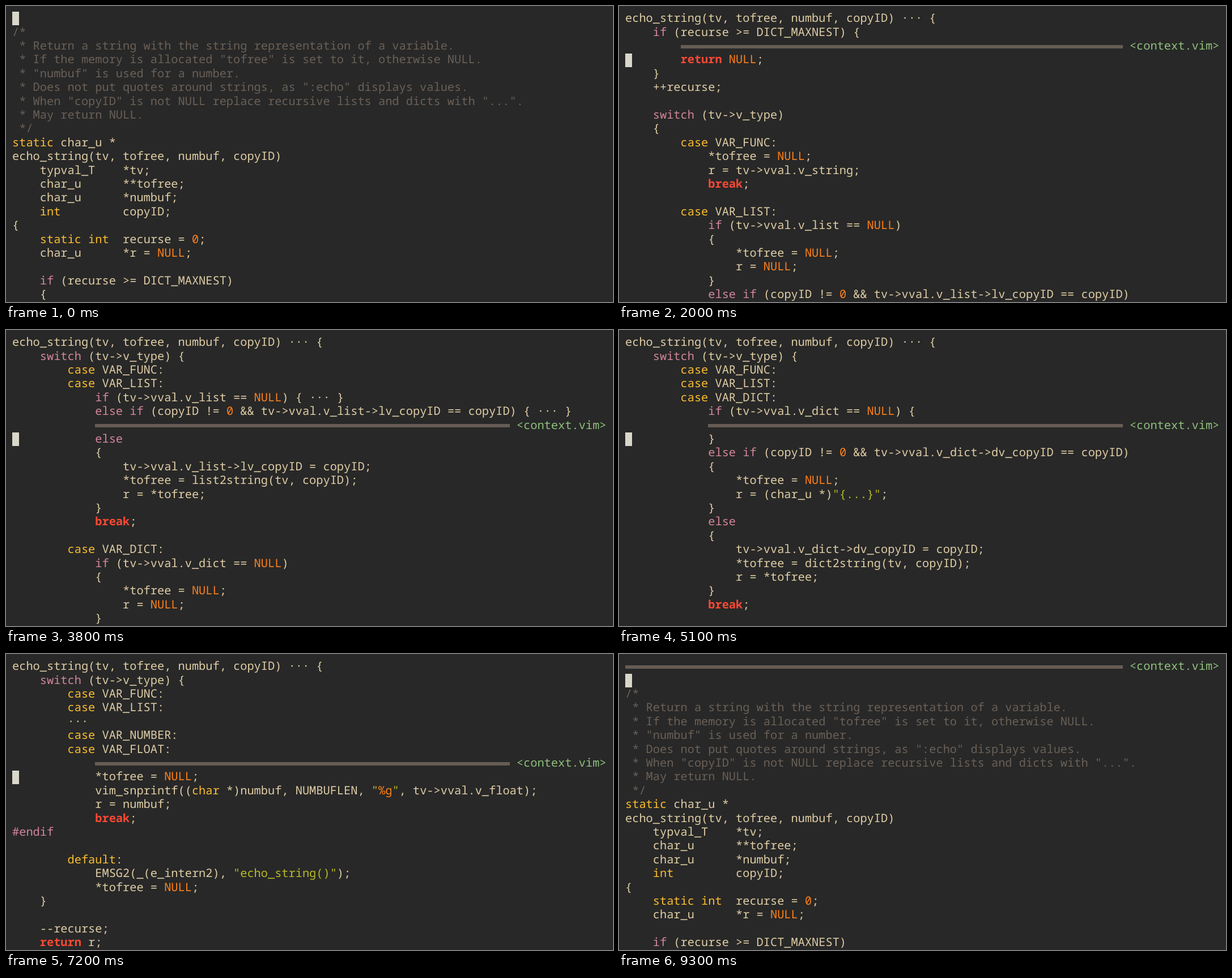
Write an HTML page that moves like this. It is 1071x523 px and loops after 9400 ms.

```html
<!DOCTYPE html>
<html lang="en">
<head>
<meta charset="utf-8">
<title>Scrolling code with context</title>
<style>
html, body { margin: 0; width: 100%; height: 100%; overflow: hidden; background: #282828; }
#screen {
  position: relative; width: 1071px; height: 523px; overflow: hidden;
  color: #dfcda5;
  font: 20.32px/24.4px "Noto Sans Mono", "DejaVu Sans Mono", monospace;
  font-variant-ligatures: none;
  text-rendering: geometricPrecision;
}
.row, .bar, .block { position: absolute; white-space: pre; }
.row { left: 11px; height: 24.4px; }
.bar { height: 6px; background: #665c54; }
.block { left: 11px; width: 12px; height: 24px; background: #d9d7ca; }
.comment { color: #6a6057; }
.string { color: #b8bb26; }
.constant { color: #fe8019; }
.jump { color: #fb4934; font-weight: bold; }
.branch { color: #d3869b; }
.type { color: #fabd2f; }
.tag { color: #8ec07c; }
.under { color: #282828; }
</style>
</head>
<body>
<div id="screen"></div>
<script>
const code = String.raw`
/*
 * Return a string with the string representation of a variable.
 * If the memory is allocated "tofree" is set to it, otherwise NULL.
 * "numbuf" is used for a number.
 * Does not put quotes around strings, as ":echo" displays values.
 * When "copyID" is not NULL replace recursive lists and dicts with "...".
 * May return NULL.
 */
static char_u *
echo_string(tv, tofree, numbuf, copyID)
    typval_T    *tv;
    char_u      **tofree;
    char_u      *numbuf;
    int         copyID;
{
    static int  recurse = 0;
    char_u      *r = NULL;

    if (recurse >= DICT_MAXNEST)
    {
        EMSG(_("E724: variable nested too deep for displaying"));
        *tofree = NULL;
        return NULL;
    }
    ++recurse;

    switch (tv->v_type)
    {
        case VAR_FUNC:
            *tofree = NULL;
            r = tv->vval.v_string;
            break;

        case VAR_LIST:
            if (tv->vval.v_list == NULL)
            {
                *tofree = NULL;
                r = NULL;
            }
            else if (copyID != 0 && tv->vval.v_list->lv_copyID == copyID)
            {
                *tofree = NULL;
                r = (char_u *)"[...]";
            }
            else
            {
                tv->vval.v_list->lv_copyID = copyID;
                *tofree = list2string(tv, copyID);
                r = *tofree;
            }
            break;

        case VAR_DICT:
            if (tv->vval.v_dict == NULL)
            {
                *tofree = NULL;
                r = NULL;
            }
            else if (copyID != 0 && tv->vval.v_dict->dv_copyID == copyID)
            {
                *tofree = NULL;
                r = (char_u *)"{...}";
            }
            else
            {
                tv->vval.v_dict->dv_copyID = copyID;
                *tofree = dict2string(tv, copyID);
                r = *tofree;
            }
            break;

        case VAR_STRING:
        case VAR_NUMBER:
            *tofree = NULL;
            r = get_tv_string_buf(tv, numbuf);
            break;

#ifdef FEAT_FLOAT
        case VAR_FLOAT:
            *tofree = NULL;
            vim_snprintf((char *)numbuf, NUMBUFLEN, "%g", tv->vval.v_float);
            r = numbuf;
            break;
#endif

        default:
            EMSG2(_(e_intern2), "echo_string()");
            *tofree = NULL;
    }

    --recurse;
    return r;
}`;

const lines = code.split("\n");
const count = lines.length;
const stepMs = 100, rows = 21, columns = 86;
const left = 11, top0 = 10.4, cellW = 12.19, cellH = 24.4;
const textLift = 2.3, barDrop = 9.4;
const tag = "<context.vim>", dots = "···", maxPerIndent = 5;

const skipRe = /^\s*($|#|\/\*|\*(\s|\/|$))/;
const extendRe = /^\s*([\]{})]|else\b|case\b|default\b)/;
const joinRe = /^\W*$/;
const tokenRe = /("[^"]*")|\b(NULL|\d+)\b|\b(return|break)\b|\b(if|else|switch)\b|\b(static|int|char|case|default)\b/g;
const kinds = ["string", "constant", "jump", "branch", "type"];

const lineAt = n => lines[n % count];
const indentOf = s => s.search(/\S|$/);
const escapeText = s => s.replace(/&/g, "&amp;").replace(/</g, "&lt;");
const span = (kind, s) => `<span class="${kind}">${s}</span>`;

function highlight(text) {
  if (/^#/.test(text)) return span("branch", escapeText(text));
  if (skipRe.test(text)) return span("comment", escapeText(text));
  let out = "", last = 0;
  for (const m of text.matchAll(tokenRe)) {
    const kind = kinds[m.slice(1).findIndex(Boolean)];
    const body = escapeText(m[0]).replace("%g", span("constant", "%g"));
    out += escapeText(text.slice(last, m.index)) + span(kind, body);
    last = m.index + m[0].length;
  }
  return out + escapeText(text.slice(last));
}

// Walk upwards from a line and collect the lines that enclose it.
function parentsOf(n) {
  const found = [];
  let current = lineAt(n);
  for (let i = n % count - 1; i >= 0; i--) {
    const text = lines[i];
    if (skipRe.test(text)) continue;
    const a = indentOf(text), b = indentOf(current);
    if (a < b || (a === b && extendRe.test(current))) {
      found.unshift(i);
      current = text;
    }
  }
  return found;
}

function contextOf(n) {
  const joined = [];
  let last = 0;
  for (const i of parentsOf(n)) {
    const text = lines[i];
    if (joined.length && joinRe.test(text)) {
      const gap = i > last + 1 ? " " + dots : "";
      joined[joined.length - 1] += gap + " " + text.trim();
    } else {
      joined.push(text);
    }
    last = i;
  }
  const groups = new Map();
  for (const text of joined) {
    const indent = indentOf(text);
    if (!groups.has(indent)) groups.set(indent, []);
    groups.get(indent).push(text);
  }
  return [...groups].flatMap(([indent, list]) =>
    list.length <= maxPerIndent ? list
      : [...list.slice(0, 2), " ".repeat(indent) + dots, ...list.slice(-2)]);
}

// Find the first line below the top whose context fits above it.
function layout(top) {
  let skipped = 0;
  for (let offset = 0; ; offset++) {
    const text = lineAt(top + offset);
    if (skipRe.test(text)) { skipped++; continue; }
    const context = contextOf(top + offset);
    const room = offset - skipped;
    if (!context.length && room === 0) return { context, height: 0, indent: 0 };
    const need = context.length + 1;
    if (need <= offset) {
      return { context, height: Math.max(need, room), indent: indentOf(text) };
    }
    skipped = 0;
  }
}

const rowTop = r => top0 + r * cellH;
const rowHtml = (r, body, x = left) =>
  `<div class="row" style="top:${rowTop(r) - textLift}px;left:${x}px">${body}</div>`;

function barHtml(r, indent) {
  const tagColumn = columns - tag.length;
  const x = left + indent * cellW;
  const width = (tagColumn - 1 - indent) * cellW;
  return `<div class="bar" style="top:${rowTop(r) + barDrop}px;left:${x}px;width:${width}px"></div>`
    + rowHtml(r, span("tag", escapeText(tag)), left + tagColumn * cellW);
}

function frameHtml(top) {
  const { context, height, indent } = layout(top);
  let html = "";
  for (let r = 0; r < rows; r++) {
    if (r === height - 1) html += barHtml(r, indent);
    else html += rowHtml(r, highlight(r < height ? context[r] || "" : lineAt(top + r)));
  }
  const letter = lineAt(top + height).slice(0, 1);
  return html + `<div class="block" style="top:${rowTop(height)}px"></div>`
    + rowHtml(height, span("under", escapeText(letter)));
}

const screen = document.getElementById("screen");
const frames = lines.map((_, top) => frameHtml(top));
let shown = -1;

function tick() {
  const step = Math.floor(performance.now() / stepMs) % count;
  if (step !== shown) {
    screen.innerHTML = frames[step];
    shown = step;
  }
  requestAnimationFrame(tick);
}
tick();
</script>
</body>
</html>
```
